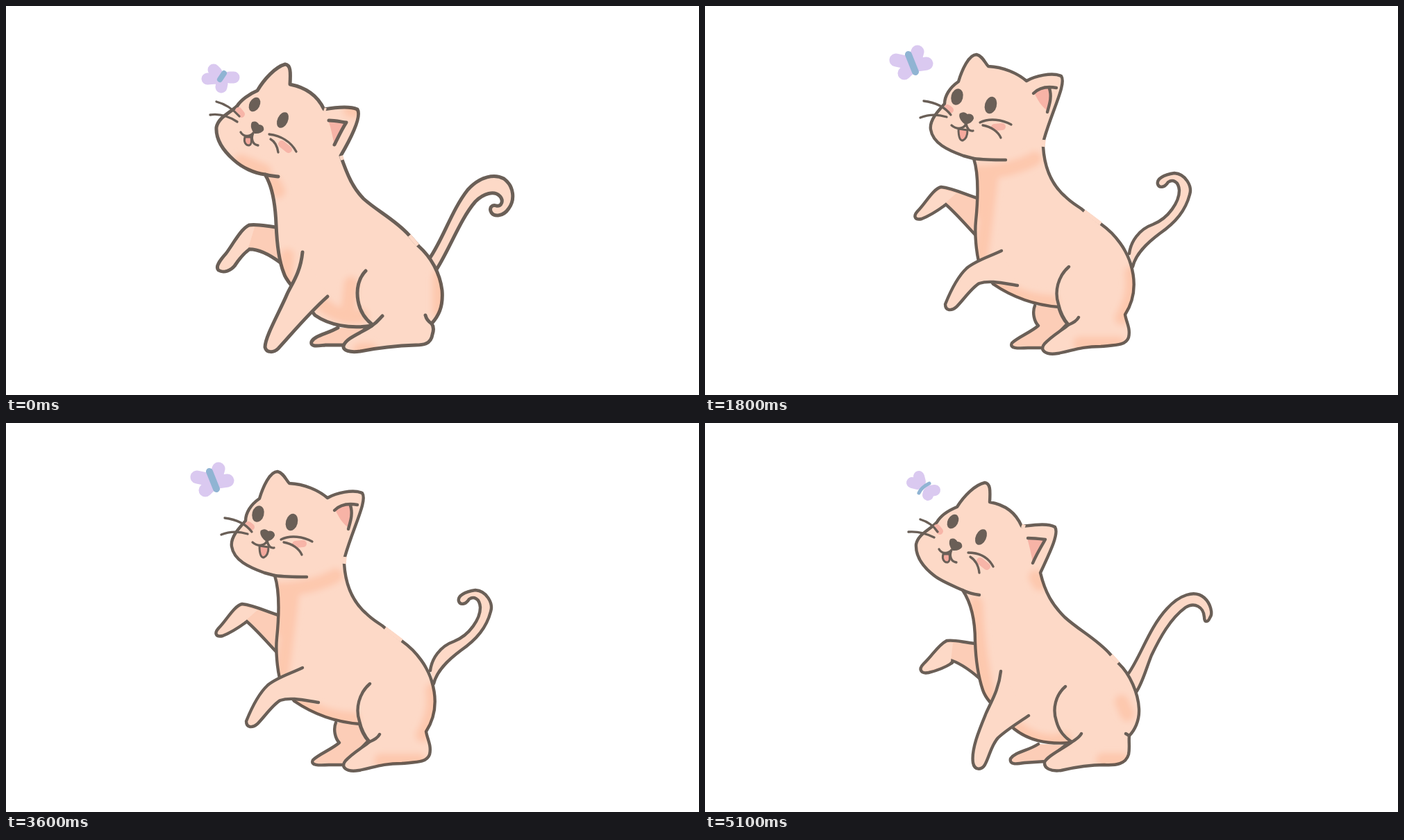
An HTML page without scripts that plays this animation: 998x561 px, repeating every 5200 ms.

```html
<!DOCTYPE html>
<html lang="en">
<head>
<meta charset="utf-8">
<title>Cat and butterfly</title>
<style>
html, body { margin: 0; width: 100%; height: 100%; overflow: hidden; background: #fff; }
/* Five poses stacked in one strip, played up and down */
.strip { display: block; width: 998px; height: 2805px; animation: play 5.2s step-end infinite; }
@keyframes play {
  0%, 21.153%, 40.384%, 61.538%, 80.769% { transform: translateY(0); }
  3.846%, 19.230%, 23.076%, 38.461%, 44.230%, 57.692%, 63.461%, 78.846%, 84.615%, 98.076% { transform: translateY(-561px); }
  5.769%, 15.384%, 26.923%, 36.538%, 46.153%, 55.769%, 65.384%, 76.923%, 86.538%, 96.153% { transform: translateY(-1122px); }
  7.692%, 13.461%, 28.846%, 34.615%, 48.076%, 53.846%, 69.230%, 73.076%, 88.461%, 94.230% { transform: translateY(-1683px); }
  11.538%, 30.769%, 50%, 71.153%, 90.384% { transform: translateY(-2244px); }
}
path { fill: none; stroke: #6a5f57; stroke-width: 4.4; stroke-linecap: round; stroke-linejoin: round; }
.bold path { stroke-width: 5; }
.skin { fill: #fdd9c7; }
.far { fill: #fccdb7; }
path.gap { stroke: #fdd9c7; stroke-width: 5.4; stroke-linecap: butt; }
.shade { mix-blend-mode: multiply; }
.shade path { stroke: #ffebdf; stroke-width: 20; filter: url(#soft); }
.pink { fill: #f7b3a6; stroke: none; }
path.blush { stroke: #f7b5a8; stroke-width: 10; }
path.hair { stroke-width: 3.3; }
.eye { fill: #6a5f57; }
path.tongue { fill: #f5a99d; stroke-width: 3; }
path.nose { fill: #6a5f57; stroke-width: 3; }
path.wing { stroke: #dac9f0; stroke-width: 17; }
path.bug { stroke: #90b4d3; stroke-width: 10; }
</style>
</head>
<body>
<svg class="strip" viewBox="0 0 998 2805">
<defs>
  <filter id="soft" x="-100" y="-100" width="1200" height="800" filterUnits="userSpaceOnUse"><feGaussianBlur stdDeviation="4"/></filter>
  <path id="nose" class="nose" d="M-8,-5C-4,-8 -1,-6 1,-4C4,-6 8,-5 9,-1C8,4 3,6 0,7C-4,5 -9,0 -8,-5Z"/>
  <g id="face">
    <path class="blush" d="M335,151l4,5M397,199l10,8"/>
    <ellipse class="eye" rx="7.500" ry="11" transform="translate(358,142) rotate(28)"/>
    <ellipse class="eye" rx="7.500" ry="12" transform="translate(398.500,164.500) rotate(25)"/>
    <use href="#nose" transform="translate(361,176) rotate(22)"/>
    <path class="tongue" d="M344,189C342,196 345,201 350,201C354,200 354,195 353,189Z"/>
    <path class="hair" d="M338,182C342,189 351,189 356,183C352,193 356,200 363,201"/>
  </g>
  <clipPath id="c0"><use href="#b0"/></clipPath>
  <clipPath id="c1"><use href="#b1"/></clipPath>
  <clipPath id="c2"><use href="#b2"/></clipPath>
  <clipPath id="c3"><use href="#b3"/></clipPath>
  <clipPath id="c4"><use href="#b4"/></clipPath>
</defs>

<g class="bold">
  <path class="wing" d="M299,92l4,4M290,105l12,-1M322,103l6,0M311,112l-1,5"/>
  <path class="bug" style="stroke-width:8" d="M308,106l6,-9"/>
  <path class="skin" d="M610,364C630,335 642,294 665,265C683,245 704,242 717,249C732,260 733,280 724,292C716,304 703,304 699,298C695,291 700,286 706,288C714,290 717,280 711,274C703,266 688,270 676,282C655,306 640,348 620,380"/>
  <path class="far" d="M389,319C372,317 360,314 350,316C338,322 328,342 317,357C308,367 301,376 306,381C314,386 324,381 329,375C335,366 342,357 349,352L346,351C360,349 375,355 395,370"/>
  <path class="skin" style="stroke:none" d="M358,319L350,319C341,323 330,343 319,358C310,368 305,377 308,379C314,383 322,379 327,373C333,364 341,355 349,349Z"/>
  <path class="far" d="M478,464C462,473 445,475 440,484C438,492 448,490 460,489L488,489L520,464"/>
  <path id="b0" class="skin" d="M373,243C357,241 340,233 328,222C311,207 302,192 303,175C306,160 322,155 333,144C338,136 350,127 362,122C372,105 388,88 402,84C410,85 410,95 409,113C435,118 450,132 458,149C475,146 495,144 506,149C512,158 500,185 482,216C492,245 500,263 515,278C535,296 560,308 580,330L594,346C612,362 625,385 628,410C630,435 622,448 613,458C616,462 616,468 614,474C612,488 600,489 590,489C560,490 530,494 510,498C495,500 485,497 486,490C490,478 515,470 527,461C495,466 465,460 445,446L411,403C407,398 402,392 400,385C392,365 390,340 389,315C388,290 385,262 373,243Z"/>
  <g class="shade" clip-path="url(#c0)"><path d="M386,255l6,12M338,224l34,14M405,360l-3,35M450,425C470,444 490,452 512,447M497,400l-4,35M624,390v50M496,151h8M510,496h15"/></g>
  <path class="gap" d="M482.500,216l2,6M581,331l12,14M458,149l3,1"/>
  <path class="skin" d="M427,355C424,385 412,400 405,415C394,441 373,477 373,492C375,501 386,500 392,494C408,477 432,447 463,419"/>
  <path d="M373,243C380,245 386,245 392,246M613,458C608,455 605,450 604,446M527,461C535,456 538,451 542,447M518,382C508,392 504,408 507,425C510,442 518,452 527,459"/>
  <path class="pink" d="M464,165L489,170L473,200C470,188 468,175 464,165Z"/>
  <path d="M465,165C474,165 482,167 490,168C483,179 478,190 473,200"/>
  <use href="#face"/>
  <path class="hair" d="M303,138C315,141 327,149 336,159M294,157C307,155 319,158 333,167M379,185C395,187 410,195 418,210M381,192C388,196 391,204 392,211"/>
</g>

<g transform="translate(0,561)">
  <path class="wing" style="stroke-width:16" d="M308,77l2,8M298,86l8,2M331,97l-7,1M321,104l1,-4"/>
  <path class="bug" style="stroke-width:5" d="M308,101C311,94 317,90 323,87"/>
  <path class="skin" d="M610,361C628,335 640,295 665,268C683,248 705,240 719,252C728,260 732,275 727,281C724,288 719,288 719,280C718,265 705,258 692,266C670,282 655,310 643,335C635,355 630,375 621,388"/>
  <path class="far" d="M388,318C370,316 358,312 348,314C335,321 328,335 315,347C306,356 312,362 322,360C335,357 345,353 356,346L351,341C365,345 380,355 395,368"/>
  <path class="skin" style="stroke:none" d="M357,317L348,317C338,322 328,338 317,349C311,356 313,359 322,357C335,354 345,350 354,344Z"/>
  <path class="far" d="M480,463C465,473 447,474 440,484C438,493 448,492 460,490L490,488L520,464"/>
  <path id="b1" class="skin" d="M371,241C353,233 340,228 330,220C312,206 303,192 304,175C307,160 323,155 334,143C339,134 351,126 363,121C373,105 389,89 403,86C411,87 411,97 410,114C433,118 448,130 456,149C474,147 494,144 504,150C510,159 498,184 483,216C490,245 500,262 518,280C540,300 565,312 584,334L596,347C612,362 624,390 625,412C626,430 618,444 611,451C610,460 612,468 610,478C606,492 592,494 575,493C550,493 530,497 513,501C498,503 488,498 489,489C493,480 515,470 527,461C490,464 465,457 445,441L410,402C405,396 402,391 400,385C395,370 390,345 389,315C389,290 385,262 371,241Z"/>
  <g class="shade" clip-path="url(#c1)"><path d="M390,260C392,300 398,350 408,395M450,440C470,456 495,464 518,456M600,402l8,18M573,486h28M476,222l6,10"/></g>
  <path class="gap" d="M585,335l10,11M456,148l5,2"/>
  <path class="skin" d="M426,358C423,385 412,402 405,418C396,440 383,470 386,490C388,501 398,501 403,493C410,480 412,465 422,454C435,442 450,433 466,422"/>
  <path d="M371,241C379,245 387,247 395,248M611,451L606,448M527,461C535,456 540,452 542,448M519,380C505,392 500,412 506,430C510,445 518,453 528,460"/>
  <path class="pink" d="M464,166L488,169L472,202C470,189 467,177 464,166Z"/>
  <path d="M465,166C474,166 482,167 490,168C483,180 477,190 472,202"/>
  <use href="#face" transform="translate(-1,0)"/>
  <path class="hair" d="M310,139C320,142 329,148 335,157M293,157C305,156 318,159 330,165M379,187C395,187 408,194 415,207M382,193C390,198 394,207 395,216"/>
</g>

<g transform="translate(0,1122)">
  <path class="wing" style="stroke-width:15" d="M301,76l8,6M299,97l8,-7M330,73l-8,10M330,91l-8,-3"/>
  <path class="bug" d="M314,72l2,21"/>
  <path class="skin" d="M612,358C619,333 631,313 655,302C680,292 704,288 717,268C721,258 719,253 716,247C713,238 725,236 729,245C735,259 732,276 718,290C700,306 667,311 647,325C631,338 623,356 621,375"/>
  <path class="far" d="M383,295C368,292 355,287 343,287C331,293 322,312 312,325C303,335 296,341 301,347C309,351 321,347 329,340C336,332 343,325 350,319L345,318C362,320 375,332 387,346"/>
  <path class="skin" style="stroke:none" d="M354,291L344,290C335,294 325,312 314,326C305,336 300,342 303,345C310,348 320,345 327,338C334,330 342,321 350,317Z"/>
  <path class="far" d="M490,455C478,465 460,475 453,484C449,493 460,491 470,490L495,487L528,456"/>
  <path id="b2" class="skin" d="M365,224C356,220 348,216 340,212C320,203 305,190 305,172C307,160 320,148 331,140C335,128 345,118 357,112C366,95 378,73 390,72C399,73 400,82 402,98C425,100 445,108 455,127C470,121 492,119 505,124C512,135 495,165 487,187L487,198C488,230 497,260 518,277C530,287 545,292 553,299L568,313C590,330 608,346 615,365C623,385 624,405 620,420C617,435 610,443 605,449C608,460 616,468 613,480C608,493 590,493 570,493C540,493 525,500 505,502C492,503 488,496 493,489C504,475 520,468 528,460C525,458 523,456 520,453C465,452 440,430 420,412L396,375C388,360 383,345 382,310C381,280 380,250 365,224Z"/>
  <g class="shade" clip-path="url(#c2)"><path d="M380,236l35,6M390,245L394,300M384,300C385,330 390,350 400,370M408,250l-11,70M425,408C445,430 475,447 512,445M615,370C622,400 615,425 602,445l4,35"/></g>
  <path class="gap" d="M487,187v11M553,299l15,14"/>
  <path class="skin" d="M412,352C403,368 390,380 384,392C374,412 364,440 365,465C367,477 376,473 381,463C388,445 394,422 410,413C422,408 435,405 448,404"/>
  <path d="M365,224C380,229 394,233 408,234M528,460C537,454 540,450 543,448M524,378C508,390 503,412 508,430C512,445 520,453 528,460"/>
  <path class="pink" d="M460,146C470,142 478,141 486,142C487,156 480,168 475,178C468,168 464,156 460,146Z"/>
  <path d="M461,146C472,141 484,140 495,142M486,142C487,156 481,167 475,178"/>
  <path class="blush" d="M334,147l4,7M400,184l12,5"/>
  <ellipse class="eye" rx="8.500" ry="11.500" transform="translate(352.500,133) rotate(28)"/>
  <ellipse class="eye" rx="8.500" ry="12.500" transform="translate(397,151) rotate(20)"/>
  <use href="#nose" transform="translate(360,166) rotate(15)"/>
  <path class="tongue" d="M347,180C346,187 349,192 353,192C357,190 358,185 357,179Z"/>
  <path class="hair" d="M343,176C349,182 356,180 358,174C358,180 360,184 363,186M308,139C319,142 329,148 336,157M289,159C303,156 317,156 330,163M381,176C397,174 412,180 421,192M385,182C395,187 401,197 402,207"/>
</g>

<g transform="translate(0,1683)">
  <path class="wing" style="stroke-width:19" d="M275,78l14,3M287,97l6,-6M306,66l-3,11M319,83l-14,2"/>
  <path class="bug" d="M293,70l10,25"/>
  <path class="skin" d="M611,357C613,340 625,322 645,315C668,306 683,282 683,266C682,252 673,250 667,254C662,262 654,263 652,257C650,250 660,243 676,241C692,242 702,260 698,272C692,295 678,312 655,328C635,343 620,358 616,376"/>
  <path class="far" d="M395,278C375,272 358,263 340,261C328,264 318,284 306,296C299,304 303,309 312,307C325,302 335,295 346,287L343,283C358,295 375,315 392,333"/>
  <path class="skin" style="stroke:none" d="M362,270L341,264C330,267 320,286 308,298C303,304 305,306 312,304C325,299 335,292 345,285Z"/>
  <path class="far" d="M475,432C471,442 474,455 480,461C470,470 450,478 442,486C438,494 450,494 465,493L488,493L522,458L508,430"/>
  <path id="b3" class="skin" d="M387,220L372,216C350,208 328,198 325,178C323,165 335,152 345,141C345,130 352,118 365,109C370,92 380,70 391,70C400,72 403,82 408,87C430,88 450,97 463,108C475,101 500,95 513,101C521,112 500,150 488,193L487,203C489,235 500,258 518,274C530,286 540,290 545,295L571,315C592,330 607,352 613,372C620,395 621,420 605,445C607,457 613,465 610,478C606,490 590,489 570,491C540,491 530,497 508,501C490,504 481,496 489,487C500,475 515,467 523,460C515,452 512,443 509,434C470,431 440,418 415,401L394,368C391,355 388,330 390,310C393,280 395,245 387,220Z"/>
  <g class="shade" clip-path="url(#c3)"><path d="M395,240C420,240 455,232 475,220M400,240v60M412,250L398,360M420,400C445,418 470,425 500,427M614,385C618,410 612,430 600,450M540,487h55"/></g>
  <path class="gap" d="M488,193l-1,10M546,296l24,18"/>
  <path class="skin" d="M427,353C408,362 390,367 377,378C362,392 352,415 346,430C346,440 355,440 362,434C372,424 385,405 395,400C410,395 430,400 450,403"/>
  <path d="M387,220C402,222 418,222 433,222M523,460C533,456 536,453 538,449M524,376C508,390 503,412 509,430C512,443 517,452 523,459"/>
  <path class="pink" d="M474,125C482,119 489,118 496,119C500,131 497,142 493,151C485,145 479,136 474,125Z"/>
  <path d="M473,126C482,117 495,116 506,118M496,119C500,131 496,142 493,153"/>
  <path class="blush" d="M349,147l4,3M417,175l11,-1"/>
  <ellipse class="eye" rx="8.500" ry="12" transform="translate(363,131) rotate(15)"/>
  <ellipse class="eye" rx="8.500" ry="12.500" transform="translate(411.500,143) rotate(15)"/>
  <use href="#nose" transform="translate(376,162) rotate(5) scale(1.050)"/>
  <path class="tongue" d="M365,177C365,187 367,194 371,194C376,192 378,186 378,179Z"/>
  <path class="hair" d="M355,172C363,179 374,177 376,169C377,177 381,181 386,180M315,137C331,139 345,145 354,157M310,161C322,156 335,156 348,160M396,168C410,161 428,164 441,171M400,172C412,174 422,181 426,190"/>
</g>

<g transform="translate(0,2244)">
  <path class="wing" d="M315,94l1,8M297,109l14,1M331,109l-6,2M320,127l0,-7"/>
  <path class="bug" style="stroke-width:12" d="M311,119l14,-20"/>
  <path class="skin" d="M606,358C607,343 620,330 635,318C655,300 658,285 652,273C647,263 640,266 632,272C624,274 622,267 630,262C645,256 660,263 666,278C672,300 658,318 640,334C622,350 614,362 612,376"/>
  <path class="skin" d="M409,264C385,235 355,205 332,197C318,194 316,205 322,213C340,240 375,262 390,287C398,300 404,307 411,316"/>
  <g class="shade"><path style="stroke-width:22" d="M368,244L402,286"/></g>
  <path class="far" d="M454,420C448,435 453,450 465,455C455,468 438,475 432,484C430,493 440,493 452,490L478,487L508,458L500,430"/>
  <path id="b4" class="skin" d="M400,214C375,207 348,198 343,178C340,162 348,150 357,138C360,122 364,112 373,108C375,88 378,58 390,58C400,62 406,72 412,81C435,78 455,85 467,96C482,87 505,80 520,86C527,98 512,130 506,157L507,173C508,210 518,240 534,262C545,280 558,290 564,297L582,318C598,335 608,360 613,380C617,400 613,420 609,433L604,448C602,460 604,475 598,483C590,490 575,489 560,491C535,492 520,493 497,500C482,503 473,497 479,488C488,478 498,468 509,459C503,452 501,444 500,435C470,430 448,418 432,392L413,347C411,335 409,320 409,300C411,270 410,240 400,214Z"/>
  <g class="shade" clip-path="url(#c4)"><path d="M408,234C440,234 470,224 490,211M415,235L420,340M440,400C455,415 475,422 495,427M614,375C616,400 610,430 605,440M600,450l-10,25"/></g>
  <path class="gap" d="M506,157l1,15M565,298l16,19M609,433l-5,15"/>
  <path class="skin" d="M443,335C420,346 395,352 372,368C355,380 340,392 339,400C341,408 353,403 365,397C385,386 400,383 420,385C430,386 440,388 449,390"/>
  <path d="M400,214C420,218 445,217 458,213M509,459L516,457M514,393C500,407 498,430 509,458"/>
  <path class="pink" d="M484,110C490,106 496,104 502,103C506,115 504,126 502,136C494,131 488,121 484,110Z"/>
  <path d="M483,110C492,104 502,100 513,100M502,103C506,115 504,125 502,137"/>
  <path class="blush" d="M361,146l6,3"/>
  <path class="blush" style="stroke-width:13" d="M427,164l17,-1"/>
  <ellipse class="eye" rx="8.500" ry="12" transform="translate(372.500,132) rotate(15)"/>
  <ellipse class="eye" rx="8.500" ry="12.500" transform="translate(422.500,139.500) rotate(15)"/>
  <use href="#nose" transform="translate(388,159) scale(1.150)"/>
  <path class="tongue" d="M377,176C378,188 382,196 386,196C392,193 395,187 396,180Z"/>
  <path class="hair" d="M368,169C374,179 386,177 388,167C390,177 397,182 405,179M328,140C345,137 360,146 370,158M322,163C335,155 350,155 365,160M410,164C425,152 445,154 458,161M411,166C428,170 442,177 448,188"/>
</g>
</svg>
</body>
</html>
```
